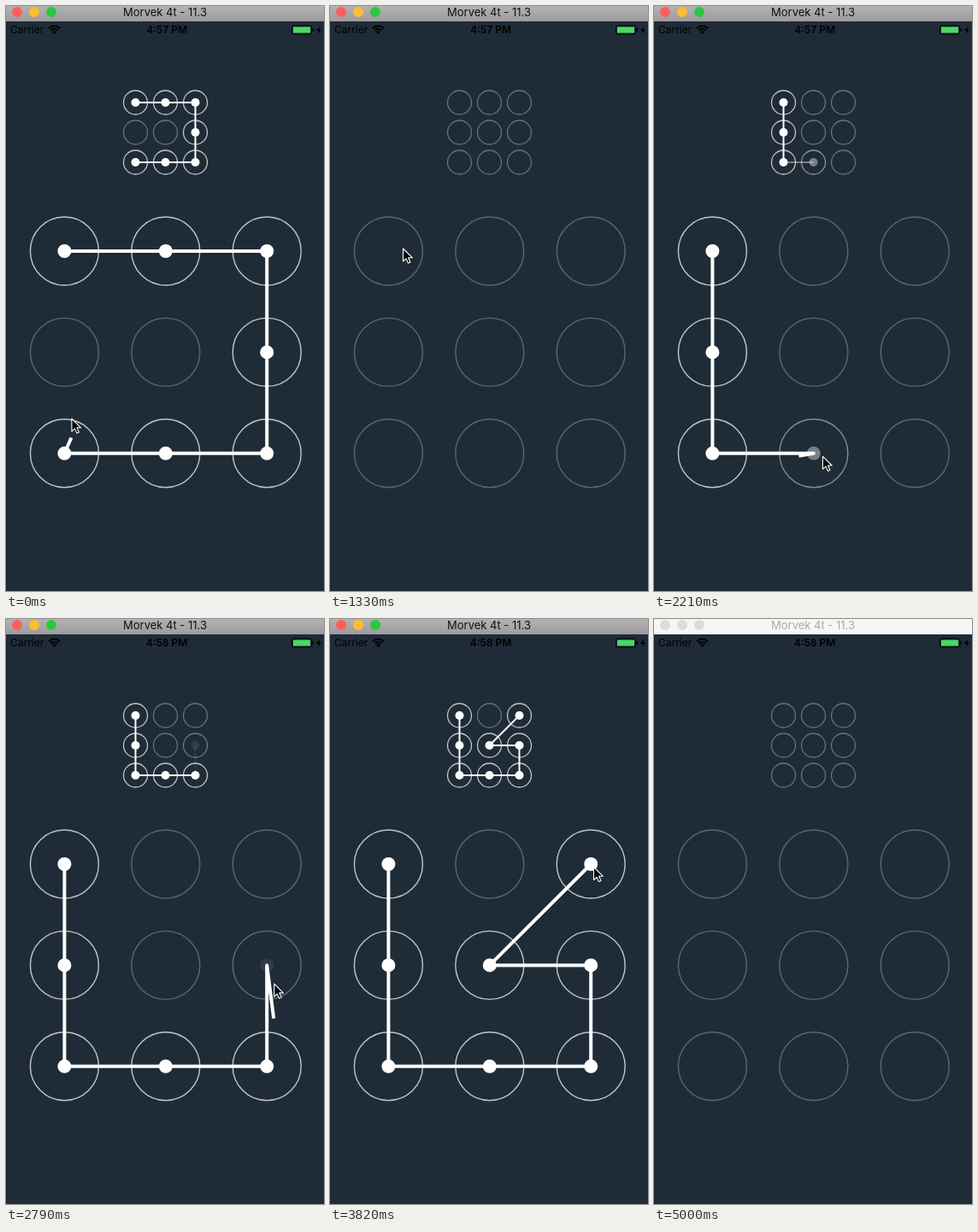
An HTML page with a canvas for the animation above (5100 ms loop, 372 by 685 pixels).

```html
<!DOCTYPE html>
<html lang="en">
<head>
<meta charset="utf-8">
<title>Pattern lock</title>
<style>
  html, body { margin: 0; width: 100%; height: 100%; overflow: hidden; background: #1f2c38; }
  canvas { display: block; width: 372px; height: 685px; }
</style>
</head>
<body>
<canvas id="stage"></canvas>
<script>
const W = 372, H = 685, LOOP = 5100, STEP = 5000 / 34;
const canvas = document.getElementById('stage');
const ctx = canvas.getContext('2d');
const dpr = window.devicePixelRatio || 1;
canvas.width = W * dpr;
canvas.height = H * dpr;
ctx.scale(dpr, dpr);

const BIG = { x: 68.4, y: 287, gap: 118.4, ring: 40, dot: 8, line: 4, width: 1.4, rest: 0.27 };
const MINI = { x: 151.5, y: 113, gap: 35, ring: 14, dot: 5, line: 2, width: 1.3, rest: 0.33 };

// Times are in steps; the hand stops at `hold` until release, then leaves for `away`.
const PATTERNS = [
  { cells: [...'012587634'], start: -13.35, release: 6, hold: [217, 419], away: [87, 282] },
  { cells: [...'03678542'], start: 10, release: 27, hold: [308, 290], away: [400, 360] }
];
const FADE = 1.5, TAIL_LAG = 0.5;

// The hand slows down as a pattern grows.
const reachTime = (pattern, i) => pattern.start + 0.98 * i ** 1.37;
const clearTime = pattern => pattern.release + 1;
const center = (g, cell) => [g.x + (cell % 3) * g.gap, g.y + Math.floor(cell / 3) * g.gap];

// The pointer passes just beside each cell's centre shortly after entering it.
const pointerKeys = PATTERNS.flatMap(p => [
  ...p.cells.map((cell, i) => {
    const [x, y] = center(BIG, cell);
    return { at: reachTime(p, i) + 0.3, x: x + 8, y: y + 3 };
  }),
  ...[[p.release - 1.5, p.hold], [p.release, p.hold], [clearTime(p) + 1, p.away]]
    .map(([at, [x, y]]) => ({ at, x, y }))
]);

function pointerAt(step) {
  const next = pointerKeys.findIndex(key => key.at >= step);
  const b = pointerKeys.at(next), a = pointerKeys[next - 1] || b;
  const k = b === a || next < 0 ? 1 : ((step - a.at) / (b.at - a.at)) ** 2;
  return [a.x + (b.x - a.x) * k, a.y + (b.y - a.y) * k];
}

const white = a => `rgba(255,255,255,${a})`;

function circle(x, y, r, fill, stroke, width) {
  ctx.beginPath();
  ctx.arc(x, y, r, 0, Math.PI * 2);
  if (fill) { ctx.fillStyle = fill; ctx.fill(); }
  if (stroke) { ctx.strokeStyle = stroke; ctx.lineWidth = width; ctx.stroke(); }
}

function polyline(points, color, width) {
  ctx.beginPath();
  points.forEach(p => ctx.lineTo(...p));
  ctx.strokeStyle = color;
  ctx.lineWidth = width;
  ctx.stroke();
}

function label(text, x, y, font, color, align = 'left') {
  ctx.font = `${font} Inter, sans-serif`;
  ctx.fillStyle = color;
  ctx.textAlign = align;
  ctx.fillText(text, x, y);
}

function titleBar(active) {
  const fill = ctx.createLinearGradient(0, 0, 0, 18);
  fill.addColorStop(0, active ? '#b4b1b4' : '#f6f6f6');
  fill.addColorStop(1, active ? '#9d9b9e' : '#f6f6f6');
  ctx.fillStyle = fill;
  ctx.fillRect(0, 0, W, 18);
  ['#ff5f57', '#fdbd2f', '#29c940'].forEach((color, i) =>
    circle(13 + i * 20, 7, 6, active ? color : '#dcdcdc'));
  label('Morvek 4t - 11.3', 186, 12, '13px', active ? '#111' : '#a9a9a9', 'center');
}

function statusBar(step) {
  label('Carrier', 5, 32, '12px', '#000');
  label(step < 18 ? '4:57 PM' : '4:58 PM', 188, 32, '600 12px', '#000', 'center');

  // Wi-Fi fan
  const from = -Math.PI * 0.76, to = -Math.PI * 0.24;
  ctx.strokeStyle = '#000';
  ctx.lineWidth = 2;
  [5.5, 9].forEach(r => {
    ctx.beginPath();
    ctx.arc(56.5, 32.5, r, from, to);
    ctx.stroke();
  });
  ctx.beginPath();
  ctx.moveTo(56.5, 33);
  ctx.arc(56.5, 33, 3.5, from, to);
  ctx.fill();

  // Battery and charging bolt
  ctx.lineWidth = 1;
  ctx.beginPath();
  ctx.roundRect(334.5, 23, 23, 10, 2);
  ctx.stroke();
  ctx.fillRect(358.5, 26, 1.5, 4);
  ctx.fill(new Path2D('M367 23.5 L363 29 H365.8 L364.8 33 L369 27.3 H366.2 Z'));
  ctx.fillStyle = '#4cd964';
  ctx.fillRect(336, 24.5, 20, 7);
}

function grid(g, pattern, step) {
  const reached = pattern ? pattern.cells.filter((_, i) => reachTime(pattern, i) <= step) : [];
  const alphas = reached.map((_, i) => Math.min(1, (step - reachTime(pattern, i)) / FADE));
  const points = reached.map(cell => center(g, cell));

  for (let cell = 0; cell < 9; cell++) {
    const a = alphas[reached.indexOf(String(cell))] || 0;
    const [x, y] = center(g, cell);
    circle(x, y, g.ring, null, white(g.rest + (0.72 - g.rest) * a), g.width);
    circle(x, y, g.dot, white(a));
  }

  if (g === MINI) {
    points.slice(1).forEach((p, i) => polyline([points[i], p], white(alphas[i + 1]), g.line));
  } else if (points.length) {
    if (step < pattern.release) points.push(pointerAt(step - TAIL_LAG));
    polyline(points, '#fff', g.line);
  }
}

function pointer(step) {
  const [x, y] = pointerAt(step);
  const arrow = new Path2D('M0.5 0.5 V15.5 L4 12.3 L6.5 17.6 L9 16.4 L6.6 11.2 H11.2 Z');
  ctx.save();
  ctx.translate(x, y);
  ctx.fillStyle = '#000';
  ctx.fill(arrow);
  ctx.strokeStyle = '#fff';
  ctx.lineWidth = 1.1;
  ctx.stroke(arrow);
  ctx.restore();
}

function draw(now) {
  const time = now % LOOP;
  const step = Math.floor((time + 8) / STEP);
  const pattern = PATTERNS.find(p => step >= p.start && step < clearTime(p));
  ctx.lineJoin = 'round';
  ctx.fillStyle = '#1f2c38';
  ctx.fillRect(0, 0, W, H);
  titleBar(time < 5000);
  statusBar(step);
  grid(MINI, pattern, step);
  grid(BIG, pattern, step);
  pointer(step);
}

const begin = performance.now();
function frame() {
  draw(performance.now() - begin);
  requestAnimationFrame(frame);
}
frame();
</script>
</body>
</html>
```
